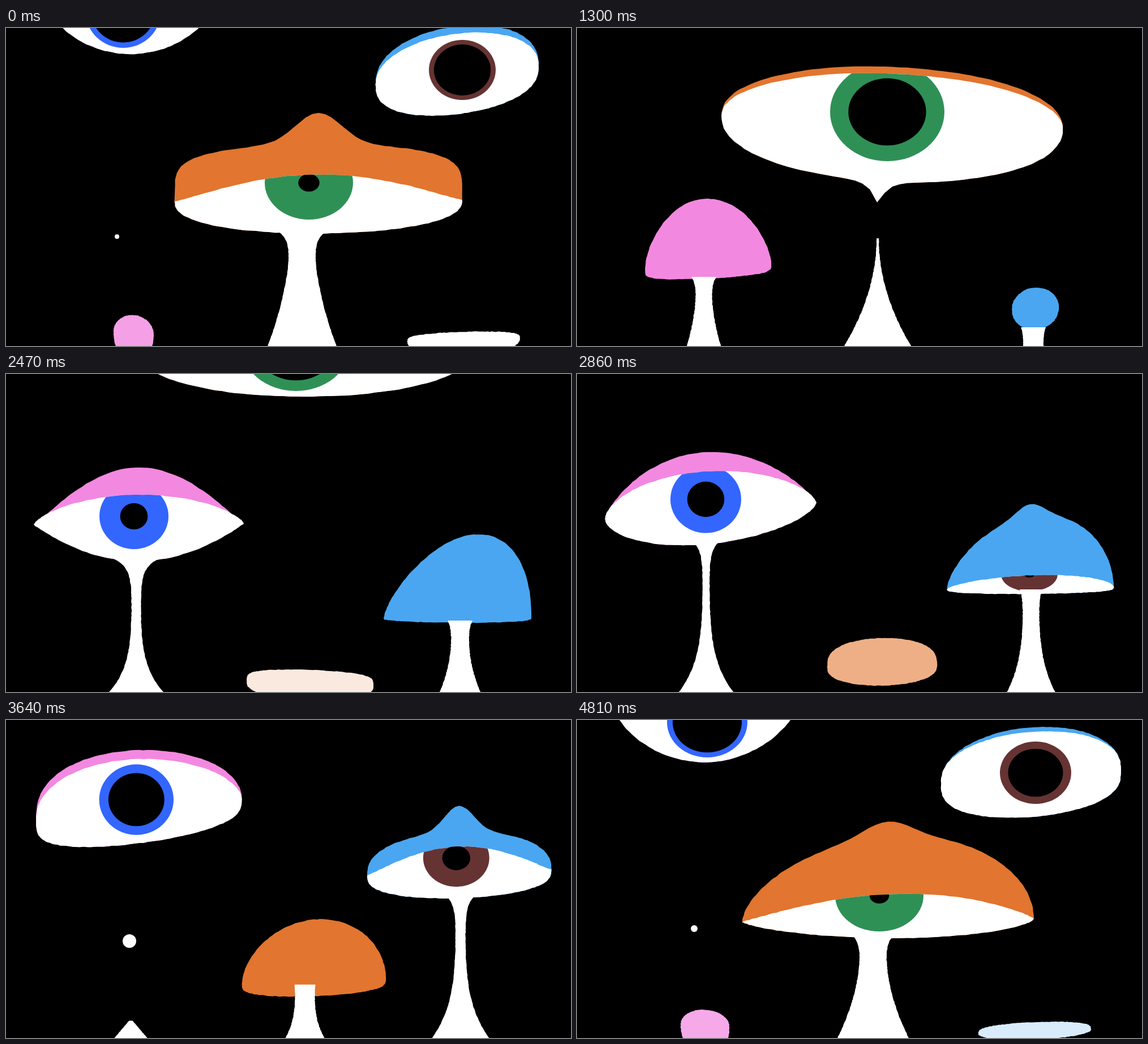
Write an HTML page with a canvas that moves like this. It is 998x561 px and loops after 4940 ms.

```html
<!DOCTYPE html>
<html lang="en">
<head>
<meta charset="utf-8">
<title>Mushroom eyes</title>
<style>
html, body { margin: 0; width: 100%; height: 100%; overflow: hidden; background: #000; }
canvas { display: block; width: 100vw; height: 100vh; }
</style>
</head>
<body>
<canvas id="stage" width="998" height="561"></canvas>
<script>
const ctx = document.getElementById('stage').getContext('2d');
const STEP = 130, LOOP = 38, FLOOR = 561, DRIFT = 25, N = 72;

const lerp = (a, b, t) => a + (b - a) * t;

// Blends two poses: objects of number lists with the same keys.
const blend = (a, b, t) => Object.fromEntries(Object.keys(a).map(k =>
  [k, a[k].map((v, i) => lerp(v, b[k][i], t))]));

function sample(track, f) {
  const j = track.findIndex(k => k.f >= f);
  if (j < 0 || (j === 0 && track[0].f > f)) return null;
  if (j === 0) return track[0].pose;
  const a = track[j - 1], b = track[j];
  return blend(a.pose, b.pose, (f - a.f) / (b.f - a.f));
}

class Mushroom {
  constructor(x, color, iris) {
    Object.assign(this, { x, color, iris, heads: [], stalks: [], drops: [] });
  }
  // left, right: corners. top: height, roundness, peak position, central bump.
  // lid, low: height, roundness. iris: x, y, radii, pupil ratio.
  // A head without a lid is closed, with the iris waiting at its rim.
  head(f, left, right, top, low, lid, iris, { tint = 1, drip = 0 } = {}) {
    const [h, r, peak = .5, bump = 0] = top;
    this.heads.push({ f, pose: {
      left, right, top: [h, r, peak, bump], low,
      lid: lid || [-low[0], low[1]],
      iris: iris || [this.x, (left[1] + right[1]) / 2, 45, 20, .1],
      extra: [tint, drip]
    } });
    return this;
  }
  // x, top, half widths at crown, waist and foot, flare exponent
  stalk(f, ...shape) { this.stalks.push({ f, pose: { shape } }); return this; }
  drop(f, ...ball) { this.drops.push({ f, pose: { ball } }); return this; }
}

const orange = new Mushroom(532, [226, 117, 47], '#2f9056')
  .head(19, [425, 545], [649, 553], [27, .2], [30, .5], null, null, { tint: .16 })
  .head(25, [459, 490], [623, 475], [73, .5], [38, .3])
  .head(32, [360, 438], [735, 432], [160, .52, .56], [8, .3])
  .head(37, [292, 356], [807, 350], [148, .52, .55, 27], [32, .6], [46, .9], [534, 310, 78, 63, .22])
  .head(38, [298, 306], [806, 303], [100, .2, .5, 55], [58, .4], [46, 1.2], [535, 273, 78, 65, .24])
  .head(42, [264, 222], [850, 215], [98, .48, .5, 21], [92, .45], [40, .5], [536, 224, 85, 74, .46])
  .head(48, [255, 155], [858, 178], [98, .45], [105, .45], [86, .48], [548, 148, 101, 87, .68], { drip: 42 })
  .head(57, [235, -40], [820, -40], [120, .45], [80, .45], [108, .48], [512, -48, 95, 78, .76])
  .stalk(25, 531, 484, 12, 16, 34, 3)
  .stalk(32, 524, 444, 27, 18, 35, 3)
  .stalk(37, 523, 378, 38, 21, 63, 2.2)
  .stalk(38, 523, 357, 45, 20, 61, 1.9)
  .stalk(42, 527, 303, 85, 12.5, 54, 5)
  .stalk(46, 529, 285, 70, 4, 58, 3)
  .stalk(48, 531, 371, 2, 2, 59, 2)
  .stalk(53, 531, 556, 2, 2, 20, 1);

const pink = new Mushroom(229, [243, 136, 224], '#3366ff')
  .head(32, [149, 555], [310, 556], [21, .2], [30, .5], null, null, { tint: .35 })
  .head(38, [190, 535], [261, 540], [31, .5], [60, .5], null, null, { tint: .8 })
  .head(42, [178, 478], [284, 480], [64, .5], [50, .4])
  .head(48, [120, 425], [343, 415], [119, .66, .48], [22, .2])
  .head(57, [49, 266], [420, 264], [100, 1.15], [65, 1], [52, .7], [226, 251, 61, 58, .4])
  .head(63, [50, 245], [425, 190], [108, .55, .43], [52, .25], [88, .6], [229, 191, 64, 61, .65])
  .head(70, [57, 82], [405, 72], [101, .42, .43], [72, .45], [91, .55], [232, 73, 68, 64, .89])
  .head(75, [62, -30], [393, -35], [70, .45], [107, .67], [60, .5], [230, 4, 71, 62, .86])
  .head(76, [65, -60], [375, -60], [80, .45], [106, .62], [70, .5], [207, -28, 66, 63, .85])
  .stalk(42, 227, 502, 8, 7, 17, 1.5)
  .stalk(48, 224, 439, 22, 12, 30, 2)
  .stalk(57, 230, 318, 60, 8, 48, 5.5)
  .stalk(60, 228, 285, 40, 6, 48, 5)
  .stalk(63, 221, 505, 4, 4, 46, 1)
  .stalk(69, 220, 556, 2, 2, 12, 1)
  .drop(62, 229, 387, 15).drop(70, 207, 393, 9).drop(75, 207, 368, 6)
  .drop(76, 196, 368, 4).drop(80, 170, 352, 4).drop(84, 160, 345, 1);

const blue = new Mushroom(804, [74, 166, 241], '#663333')
  .head(37, [709, 554], [908, 546], [17, .3], [14, .5], null, null, { tint: .21 })
  .head(38, [709, 554], [908, 548], [15, .25], [30, .5], null, null, { tint: 0 })
  .head(42, [753, 540], [867, 548], [43, .35], [40, .5], null, null, { tint: .45 })
  .head(48, [768, 496], [851, 492], [36, .5], [38, .45])
  .head(57, [667, 432], [928, 430], [148, .45, .64], [8, .3])
  .head(63, [640, 328], [968, 322], [110, .6, .5, 42], [12, .25], [54, .75], [794, 276, 55, 40, .27])
  .head(70, [635, 202], [957, 186], [22, .15, .5, 49], [90, .5], [34, 1.7], [797, 200, 63, 65, .63])
  .head(75, [643, 112], [961, 88], [87, .45], [71, .35], [79, .42], [810, 93, 63, 55, .77])
  .head(76, [653, 100], [941, 66], [86, .42], [69, .38], [73, .45], [806, 74, 59, 53, .85])
  .head(80, [662, -8], [938, -8], [85, .45], [62, .48], [75, .45], [798, -5, 63, 50, .88])
  .stalk(48, 806, 528, 22, 15, 17, 1)
  .stalk(57, 802, 435, 22, 14, 36, 2.5)
  .stalk(63, 802, 325, 18, 14, 49, 4)
  .stalk(70, 804, 272, 60, 1, 52, 5)
  .stalk(72, 804, 480, 1, 1, 34, 2)
  .stalk(74, 805, 545, 5, 5, 35, 1);

// Small hand-cut unevenness, redrawn on every step.
let seed = 0;
const rough = i => {
  const s = Math.sin(i * 12.9898 + seed * 78.233) * 43758.5453;
  return (s - Math.floor(s) - .5) * .9;
};

// Points from corner to corner; rise(u, hump, x) gives the height above the line between them.
function edge({ left, right, top }, rise) {
  const skew = Math.log(.5) / Math.log(top[2]);
  return Array.from({ length: N + 1 }, (_, i) => {
    const u = (1 - Math.cos(Math.PI * i / N)) / 2, w = u ** skew;
    const x = lerp(left[0], right[0], u);
    const y = lerp(left[1], right[1], u) - rise(u, Math.max(0, 4 * w * (1 - w)), x);
    return [x + rough(i), y + rough(i + N)];
  });
}

function fill(a, b, color) {
  ctx.beginPath();
  for (const p of [...a, ...b.slice().reverse()]) ctx.lineTo(...p);
  ctx.closePath();
  ctx.fillStyle = color;
  ctx.fill();
}

function oval(x, y, rx, ry, color) {
  ctx.beginPath();
  ctx.ellipse(x, y, rx, ry, 0, 0, Math.PI * 2);
  ctx.fillStyle = color;
  ctx.fill();
}

function drawHead(m, f) {
  // Heads enter from below and leave upwards at a steady pace.
  const held = Math.max(m.heads[0].f, Math.min(m.heads[m.heads.length - 1].f, f));
  if (Math.abs(f - held) > 3) return;
  const pose = sample(m.heads, held);
  const { top, lid, low, iris: [x, y, rx, ry, k], extra: [tint, drip] } = pose;
  const topEdge = edge(pose, (u, s) => top[0] * s ** top[1] + top[3] * Math.exp(-(((u - .5) / .11) ** 2)));
  const lidEdge = edge(pose, (u, s) => lid[0] * s ** lid[1]);
  const lowEdge = edge(pose, (u, s, px) => -low[0] * s ** low[1] - drip * Math.exp(-Math.abs(px - m.x) / 15));
  ctx.save();
  ctx.translate(0, (held - f) * DRIFT);
  fill(topEdge, lowEdge, `rgb(${m.color.map(c => Math.round(lerp(255, c, tint)))})`);
  fill(lidEdge, lowEdge, '#fff');
  ctx.clip();
  oval(x, y, rx, ry, m.iris);
  oval(x, y, rx * k, ry * k, '#000');
  ctx.restore();
}

function drawStalk(m, f) {
  const pose = sample(m.stalks, f);
  if (!pose) return;
  const [x, top, crown, waist, foot, flare] = pose.shape;
  const side = dir => Array.from({ length: N + 1 }, (_, i) => {
    const t = i / N, y = lerp(top, FLOOR, t);
    const half = waist + (crown - waist) * Math.exp((top - y) / 16) + (foot - waist) * t ** flare;
    return [x + dir * half + rough(i * dir), y];
  });
  fill(side(-1), side(1), '#fff');
}

function drawDrop(m, f) {
  const pose = sample(m.drops, f);
  if (!pose) return;
  const [x, y, r] = pose.ball;
  oval(x, y, r, r, '#fff');
}

function draw() {
  const n = Math.floor(performance.now() / STEP) % LOOP;
  seed = n;
  ctx.fillStyle = '#000';
  ctx.fillRect(0, 0, 998, FLOOR);
  for (const m of [pink, blue, orange])
    for (const f of [n + 2 * LOOP, n + LOOP, n])
      for (const part of [drawHead, drawStalk, drawDrop]) part(m, f);
  requestAnimationFrame(draw);
}
draw();
</script>
</body>
</html>
```
